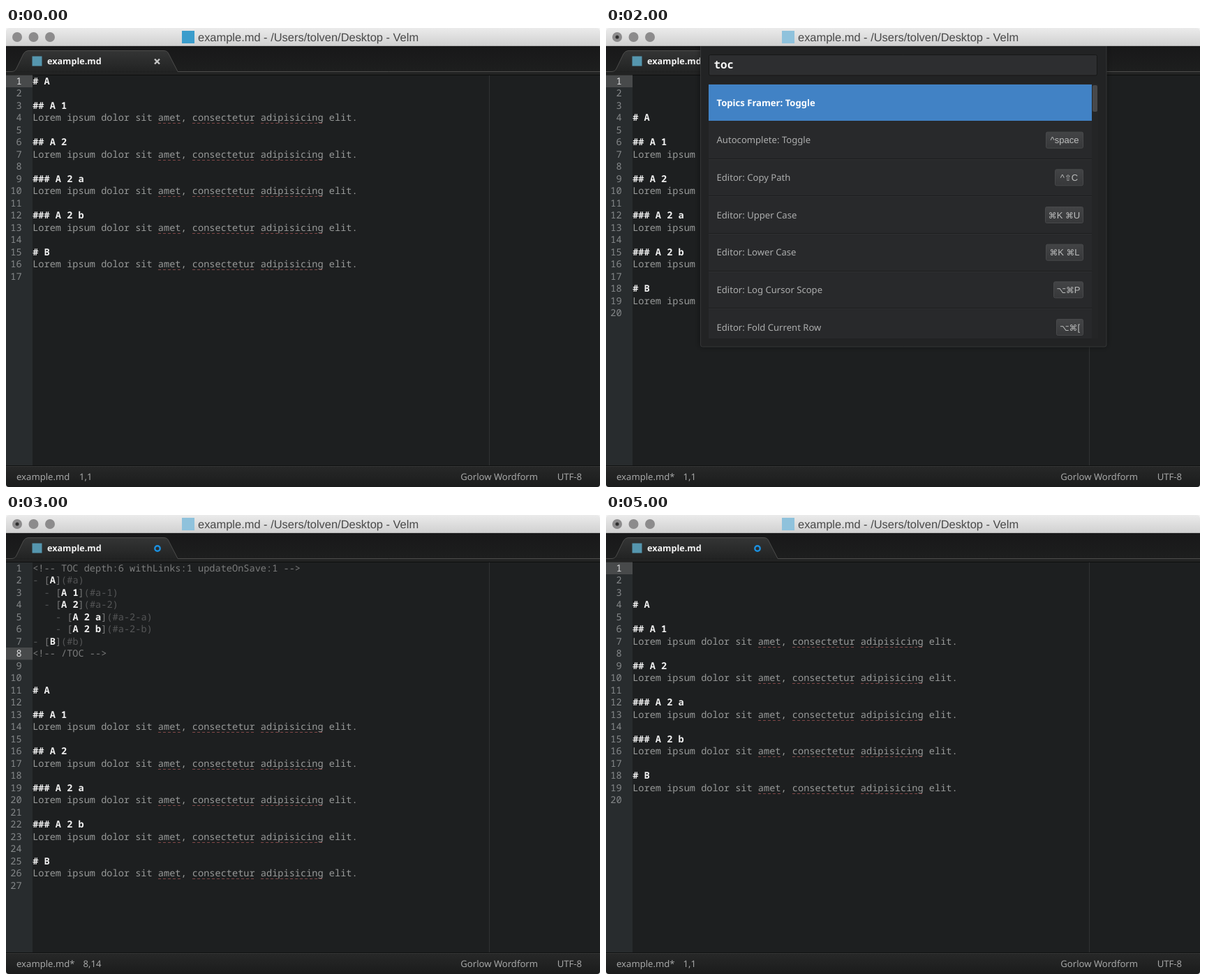
Recreate the animation shown at these times as an HTML page with a canvas. Size 851 px wide and 658 px high, loop 6 s.

```html
<!DOCTYPE html>
<html lang="en">
<head>
<meta charset="utf-8">
<title>Editor outline demo</title>
<style>
  html, body { margin: 0; width: 100%; height: 100%; overflow: hidden; background: #1d1f20; }
  canvas { display: block; width: 851px; height: 658px; }
</style>
</head>
<body>
<canvas id="stage"></canvas>
<script>
const W = 851, H = 658, STEP = 1000;
const canvas = document.getElementById('stage');
const ctx = canvas.getContext('2d');
const ratio = window.devicePixelRatio || 1;
canvas.width = W * ratio;
canvas.height = H * ratio;

const UI = '"Noto Sans", "Open Sans", sans-serif';
const MONO = '"Noto Sans Mono", "DejaVu Sans Mono", monospace';
const SANS = '"Liberation Sans", Arial, sans-serif';
const SYMBOL = '"DejaVu Sans", sans-serif';
const CODE_SIZE = 13.62, CELL = CODE_SIZE * 0.6;
const LINE = 17.5, LEFT = 38.2, FIRST = 76;

// Document contents
const LOREM = 'Lorem ipsum dolor sit amet, consectetur adipisicing elit.';
const doc = ['# A', '', '## A 1', LOREM, '', '## A 2', LOREM, '',
  '### A 2 a', LOREM, '', '### A 2 b', LOREM, '', '# B', LOREM, ''];
const spaced = ['', '', '', ...doc];
const outlined = ['<!-- TOC depth:6 withLinks:1 updateOnSave:1 -->',
  '- [A](#a)', '  - [A 1](#a-1)', '  - [A 2](#a-2)',
  '    - [A 2 a](#a-2-a)', '    - [A 2 b](#a-2-b)', '- [B](#b)',
  '<!-- /TOC -->', '', '', ...doc];

// Command rows: label, shortcut, width of the shortcut box
const common = [
  ['Autocomplete: Toggle', '^space', 54],
  ['Editor: Copy Path', '^⇧C', 41],
  ['Editor: Upper Case', '⌘K ⌘U', 55],
  ['Editor: Lower Case', '⌘K ⌘L', 54],
  ['Editor: Log Cursor Scope', '⌥⌘P', 43],
  ['Editor: Fold Current Row', '⌥⌘[', 39]
];
const toggleList = [['Topics Framer: Toggle'], ...common];
const editList = [
  ['Topics Framer: Update', '^⌥U', 41],
  ['Topics Framer: Delete', '^⌥R', 41],
  ['Topics Framer: Create', '^⌥C', 41],
  ...common.slice(0, 4)
];

const scenes = [
  { lines: doc, row: 1, pos: '1,1', saved: true },
  { lines: spaced, row: 1, pos: '1,1' },
  { lines: spaced, row: 1, pos: '1,1', list: toggleList, pick: 0 },
  { lines: outlined, row: 8, pos: '8,14' },
  { lines: outlined, row: 8, pos: '8,14', list: editList, pick: 1 },
  { lines: spaced, row: 1, pos: '1,1' }
];

function rect(x, y, w, h, fill) {
  ctx.fillStyle = fill;
  ctx.fillRect(x, y, w, h);
}

function fade(y0, y1, top, bottom) {
  const g = ctx.createLinearGradient(0, y0, 0, y1);
  g.addColorStop(0, top);
  g.addColorStop(1, bottom);
  return g;
}

function round(x, y, w, h, r, fill, stroke) {
  ctx.beginPath();
  ctx.roundRect(x, y, w, h, r);
  ctx.fillStyle = fill;
  ctx.fill();
  if (stroke) {
    ctx.strokeStyle = stroke;
    ctx.lineWidth = 1;
    ctx.stroke();
  }
}

function disc(x, y, r, fill) {
  ctx.beginPath();
  ctx.arc(x, y, r, 0, Math.PI * 2);
  ctx.fillStyle = fill;
  ctx.fill();
}

function text(str, x, y, font, fill, align = 'left') {
  ctx.font = font;
  ctx.fillStyle = fill;
  ctx.textAlign = align;
  ctx.fillText(str, x, y);
}

function code(str, col, y, fill, weight = 500) {
  text(str, LEFT + col * CELL, y, `${weight} ${CODE_SIZE}px ${MONO}`, fill);
}

function titleBar(saved) {
  rect(0, 0, W, 26, '#f4f4f4');
  round(0, 0, W, 30, [5, 5, 0, 0], fade(0, 26, '#ebebeb', '#d0d0d0'));
  rect(0, 25, W, 1, '#b5b5b5');
  [16, 39.5, 63].forEach(x => disc(x, 13, 7, '#8c8b8c'));
  if (!saved) disc(16, 13, 2.5, '#2e2e2e');
  rect(252, 4, 18, 18, saved ? '#3b9dcc' : '#8fc2dc');
  text('example.md - /Users/tolven/Desktop - Velm', 275, 18.7, `16.45px ${SANS}`, '#494949');
}

function tabPath() {
  ctx.beginPath();
  ctx.moveTo(0, 62.5);
  ctx.lineTo(8, 62.5);
  ctx.quadraticCurveTo(13, 62.5, 15, 58);
  ctx.lineTo(25, 37);
  ctx.quadraticCurveTo(27.5, 32.5, 32, 32.5);
  ctx.lineTo(226, 32.5);
  ctx.quadraticCurveTo(231, 32.5, 233, 37);
  ctx.lineTo(246, 62.5);
}

function tabBar(saved) {
  rect(0, 26, W, 42, fade(26, 62, '#181819', '#1d1e1e'));
  rect(0, 63, W, 4, '#222323');
  tabPath();
  ctx.fillStyle = fade(32, 63, '#343535', '#222323');
  ctx.fill();
  ctx.lineTo(W, 62.5);
  ctx.strokeStyle = '#4c4c4b';
  ctx.lineWidth = 1;
  ctx.stroke();
  rect(0, 67, W, 1, '#0e0f0f');

  rect(37.5, 40.5, 14, 14, '#5596ae');
  text('example.md', 59, 51.6, `600 12.6px ${UI}`, '#f4f4f4');
  ctx.beginPath();
  if (saved) {
    ctx.moveTo(213, 44.5);
    ctx.lineTo(220, 51.5);
    ctx.moveTo(220, 44.5);
    ctx.lineTo(213, 51.5);
    ctx.strokeStyle = '#c6c6c6';
  } else {
    ctx.arc(217, 48, 3.7, 0, Math.PI * 2);
    ctx.strokeStyle = '#1b90e0';
  }
  ctx.lineWidth = 2.4;
  ctx.stroke();
}

function squiggle(str, word, y) {
  const x = LEFT + str.indexOf(word) * CELL;
  ctx.beginPath();
  ctx.moveTo(x, y);
  ctx.lineTo(x + word.length * CELL, y);
  ctx.strokeStyle = '#824848';
  ctx.lineWidth = 1;
  ctx.setLineDash([4, 3]);
  ctx.stroke();
  ctx.setLineDash([]);
}

function codeLine(str, mid) {
  const y = mid + 4.7;
  const link = str.match(/^(\s*- )\[(.+)\](\(.+\))$/);
  if (link) {
    const [, lead, label, target] = link;
    const at = lead.length;
    code('-', at - 2, y, '#555657');
    code('[', at, y, '#777878');
    code(label, at + 1, y, '#f2f2f2', 700);
    code(']', at + 1 + label.length, y, '#777878');
    code(target, at + 2 + label.length, y, '#555657');
  } else if (str[0] === '#') {
    code(str, 0, y, '#f2f2f2', 700);
  } else if (str[0] === '<') {
    code(str, 0, y, '#7b7c7c');
  } else if (str) {
    code(str, 0, y, '#989a99');
    for (const word of ['amet', 'consectetur', 'adipisicing'])
      squiggle(str, word, Math.floor(mid + 8) + 0.5);
  }
}

function editor({ lines, row }) {
  rect(0, 68, W, 560, '#1d1f20');
  rect(0, 68, 38, 560, '#282c2e');
  rect(692, 68, 1, 560, '#303233');
  rect(0, FIRST - 8.5 + (row - 1) * LINE, 38, LINE, '#484a4b');
  lines.forEach((str, i) => {
    const mid = FIRST + i * LINE;
    const color = i + 1 === row ? '#dededf' : '#85888a';
    text(i + 1, 22.6, mid + 4.7, `500 ${CODE_SIZE}px ${MONO}`, color, 'right');
    codeLine(str, mid);
  });
}

function statusBar({ saved, pos }) {
  rect(0, 627, W, 31, '#f4f4f4');
  round(0, 627, W, 31, [0, 0, 4, 4], fade(628, H, '#272828', '#1b1c1c'));
  rect(0, 627, W, 1, '#101111');
  rect(0, 628, W, 1, '#353636');
  const font = `500 13.1px ${UI}`, color = '#a5a6a6';
  text(saved ? 'example.md' : 'example.md*', 15, 647.7, font, color);
  text(pos, saved ? 105 : 110.5, 647.7, font, color);
  text('Gorlow Wordform', 762, 647.7, font, color, 'right');
  text('UTF-8', 825, 647.7, font, color, 'right');
}

function shortcut(keys, width, mid, picked) {
  const left = 684 - width;
  const fill = picked ? fade(mid - 12, mid + 12, '#466a92', '#3c5f87')
    : fade(mid - 12, mid + 12, '#434446', '#37383a');
  round(left + 0.5, mid - 11.5, width - 1, 23, 2, fill, picked ? '#4a759f' : '#48494b');
  const parts = [...keys].map(ch => {
    const font = /[⌘⌥⇧]/.test(ch) ? `11.8px ${SYMBOL}` : `13px ${SANS}`;
    ctx.font = font;
    return { ch, font, size: ctx.measureText(ch).width };
  });
  let x = left + (width - parts.reduce((sum, p) => sum + p.size, 0)) / 2;
  for (const p of parts) {
    text(p.ch, x, mid + 4.7, p.font, picked ? '#ffffff' : '#bcbdbd');
    x += p.size;
  }
}

function palette({ list, pick }) {
  ctx.save();
  ctx.beginPath();
  ctx.rect(0, 26, W, H);
  ctx.clip();
  ctx.shadowColor = 'rgba(0,0,0,.45)';
  ctx.shadowBlur = 8;
  round(135, 20, 582, 437, 3, '#222324');
  ctx.shadowColor = 'transparent';
  round(135.5, 19.5, 581.5, 437.5, 3, '#222324', '#353637');
  ctx.restore();

  round(147.5, 38.5, 556, 29.5, 2, '#2d2e30', '#161717');
  text('toc', 154.5, 58.3, `600 15.9px ${MONO}`, '#f6f6f6');

  ctx.save();
  ctx.beginPath();
  ctx.rect(147, 80, 558, 365);
  ctx.clip();
  rect(147, 80, 558, 365, '#28292b');
  rect(696, 80, 9, 365, '#242526');
  list.forEach(([label, keys, width], i) => {
    const mid = 107 + i * 53.67, picked = i === pick;
    const top = Math.round(mid - 26.5), bottom = Math.round(mid + 26);
    if (picked) {
      rect(147, top, 549, bottom - top, '#4182c5');
    } else {
      rect(147, bottom, 549, 1, '#1d1e1f');
      rect(147, bottom + 1, 549, 1, '#2e2f31');
    }
    const font = `${picked ? 600 : 500} 13.1px ${UI}`;
    text(label, 158.5, mid + 4.6, font, picked ? '#ffffff' : '#acadad');
    if (keys) shortcut(keys, width, mid, picked);
  });
  round(697, 82, 7, 38, 2, '#48494b');
  ctx.restore();
}

function draw(time) {
  const scene = scenes[Math.floor(time / STEP) % scenes.length];
  ctx.setTransform(ratio, 0, 0, ratio, 0, 0);
  ctx.textBaseline = 'alphabetic';
  ctx.textRendering = 'geometricPrecision';
  titleBar(scene.saved);
  tabBar(scene.saved);
  editor(scene);
  statusBar(scene);
  if (scene.list) palette(scene);
}

let start;
function tick(now) {
  start ??= now;
  draw(now - start);
  requestAnimationFrame(tick);
}
draw(0);
requestAnimationFrame(tick);
</script>
</body>
</html>
```
